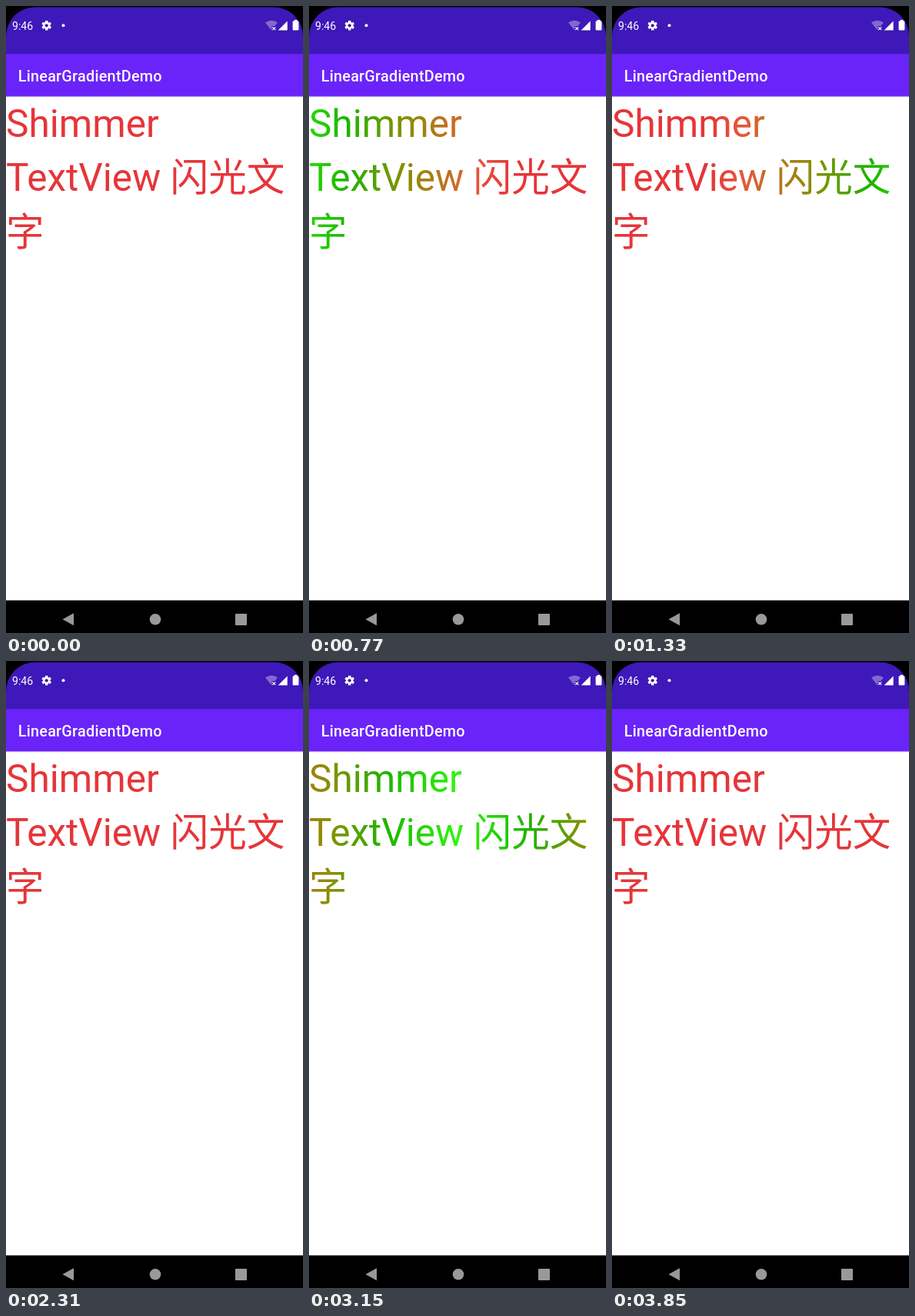
An HTML page with a canvas for the animation above (4130 ms loop, 386 px wide and 814 px high).

```html
<!DOCTYPE html>
<html lang="zh-CN">
<head>
<meta charset="utf-8">
<title>Shimmer text</title>
<style>
  html, body { margin: 0; width: 100%; height: 100%; overflow: hidden; background: #000; }
  canvas { display: block; width: 386px; height: 814px; }
</style>
</head>
<body>
<canvas id="stage" width="386" height="814"></canvas>
<script>
const ctx = document.getElementById('stage').getContext('2d');
const W = 386, H = 814;
const LOOP = 4130, SWEEP = 2100, STEP = 70;
const BAR_TOP = 62.3, BAR_BOTTOM = 117.5, NAV_TOP = 771.6;
const FONT = 'Roboto, "Noto Sans CJK SC", "Noto Sans CJK", sans-serif';
const STATUS = '#3e18b8', TOOLBAR = '#6a24fa', RED = '#e63539';

// Colours of the shimmer by distance from its bright centre.
const REACH = 386;
const BAND = [
  [0, '#2ff50f'], [93, '#1eb400'], [164, '#869000'],
  [237, '#d0692a'], [262, '#e8533a'], [305, RED], [REACH, RED]
];

function rect(color, x, y, w, h) {
  ctx.fillStyle = color;
  ctx.fillRect(x, y, w, h);
}

function disc(color, x, y, r) {
  ctx.fillStyle = color;
  ctx.beginPath();
  ctx.arc(x, y, r, 0, Math.PI * 2);
  ctx.fill();
}

function polygon(color, ...points) {
  ctx.fillStyle = color;
  ctx.beginPath();
  points.forEach(([x, y]) => ctx.lineTo(x, y));
  ctx.fill();
}

function rounded(color, x, y, w, h, r) {
  ctx.fillStyle = color;
  ctx.beginPath();
  ctx.roundRect(x, y, w, h, r);
  ctx.fill();
}

function text(str, x, y, font, spacing = '0px') {
  ctx.font = font;
  ctx.letterSpacing = spacing;
  ctx.fillText(str, x, y);
}

function gear(x, y) {
  ctx.save();
  ctx.translate(x, y);
  for (let i = 0; i < 6; i++) {
    rect('#fff', -1.7, -6.3, 3.4, 4);
    ctx.rotate(Math.PI / 3);
  }
  ctx.restore();
  disc('#fff', x, y, 4.7);
  disc(STATUS, x, y, 2.1);
}

function wifi() {
  ctx.fillStyle = 'rgba(255,255,255,0.35)';
  ctx.beginPath();
  ctx.moveTo(345, 31.5);
  ctx.lineTo(337, 21.6);
  ctx.quadraticCurveTo(345, 16, 353, 21.6);
  ctx.fill();
  rect(STATUS, 345.5, 26, 6, 6);
  ctx.strokeStyle = '#fff';
  ctx.lineWidth = 1.2;
  ctx.beginPath();
  ctx.moveTo(346.3, 27.3);
  ctx.lineTo(350.2, 31.2);
  ctx.moveTo(350.2, 27.3);
  ctx.lineTo(346.3, 31.2);
  ctx.stroke();
}

function statusBar() {
  rect(STATUS, 0, 1, W, 62);
  ctx.fillStyle = '#fff';
  text('9:46', 8, 30.7, '14.1px ' + FONT);
  gear(52.7, 25.3);
  disc('#fff', 74.5, 25.2, 2);
  wifi();
  polygon('#fff', [353.7, 31.5], [365.7, 31.5], [365.7, 19.5]);
  rounded('#fff', 372.6, 19.5, 7.8, 12, 1);
  rect('#fff', 374.6, 18, 3.8, 2);
}

function toolbar() {
  rect(TOOLBAR, 0, BAR_TOP, W, BAR_BOTTOM - BAR_TOP);
  ctx.fillStyle = '#fff';
  text('LinearGradientDemo', 15.7, 97.8, '500 19.82px ' + FONT, '0.248px');
  rect('rgba(0,0,0,0.06)', 0, 118, W, 1);
}

function navBar() {
  const gray = '#999';
  rect('#000', 0, NAV_TOP, W, H - NAV_TOP);
  polygon(gray, [73.5, 796.3], [88, 788.3], [88, 804.3]);
  disc(gray, 194, 796.3, 7.3);
  rounded(gray, 298, 789, 15, 15, 1);
}

function shimmer(center) {
  const gradient = ctx.createLinearGradient(center - REACH, 0, center + REACH, 0);
  for (const [distance, color] of BAND) {
    const offset = distance / REACH / 2;
    gradient.addColorStop(0.5 - offset, color);
    gradient.addColorStop(0.5 + offset, color);
  }
  return gradient;
}

function draw(time) {
  // The band eases in and out while crossing from -W to 2W.
  const phase = (time % SWEEP) / SWEEP;
  const center = W / 2 - 1.5 * W * Math.cos(Math.PI * phase);

  rect('#000', 0, 0, W, H);
  ctx.save();
  ctx.beginPath();
  ctx.roundRect(0, 1.4, W, H, [38, 38, 0, 0]);
  ctx.clip();
  rect('#fff', 0, 117, W, 655);
  statusBar();
  toolbar();
  ctx.fillStyle = shimmer(center);
  const big = '49.55px ' + FONT;
  text('Shimmer', 0, 170.3, big);
  text('TextView 闪光文', 0, 239.9, big);
  text('字', 0, 311.2, big);
  navBar();
  ctx.restore();
}

const start = performance.now();
function tick() {
  const time = (performance.now() - start) % LOOP;
  draw(Math.floor(time / STEP) * STEP);
  requestAnimationFrame(tick);
}
tick();
</script>
</body>
</html>
```
